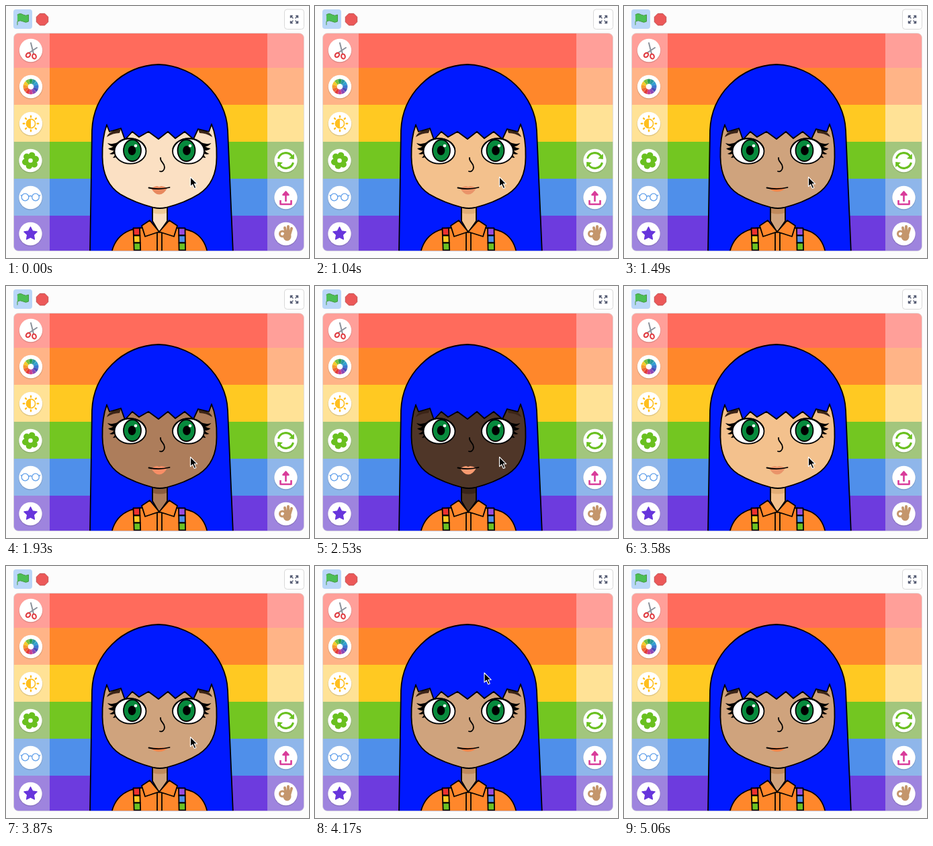
An HTML page for the animation above (5.51 s loop, 451 px wide and 375 px high).

```html
<!DOCTYPE html>
<html lang="en">
<head>
<meta charset="utf-8">
<title>Avatar maker</title>
<style>
html, body { margin: 0; width: 100%; height: 100%; overflow: hidden; background: #fcfcfc; }
svg { display: block; width: 451px; height: 375px; }
.ink { stroke: #000; stroke-width: 1.8; stroke-linejoin: round; stroke-linecap: round; }
.line { fill: none; }
</style>
</head>
<body>
<svg viewBox="0 0 451 375">
  <defs>
    <clipPath id="stageClip"><rect x="11.5" y="40.5" width="432" height="324" rx="7"/></clipPath>
    <g id="eye">
      <path d="M168 202Q159 207 151 204Q155 209 160 209Q156 212 152 212Q156 216 161 215Q158 219 154 220Q159 222 163 219Q162 223 159 226Q164 226 167 223Z"/>
      <ellipse class="ink" cx="185" cy="216" rx="23.5" ry="18.7" fill="#fff"/>
      <ellipse class="ink" cx="188" cy="215" rx="13" ry="16" fill="#078a3d"/>
      <ellipse cx="187.5" cy="215" rx="5.8" ry="7"/>
      <path class="ink line" d="M161 212Q167 197 185 197Q202 198 208 212"/>
    </g>
    <path id="brow" d="M150 195Q152 188 164 184L171 183L169 189Q159 189 150 195Z" fill="#3b2417"/>
  </defs>

  <rect x="11" y="5" width="28" height="29" rx="4" fill="#b9d6f8"/>
  <path d="M17 13Q21 10 25.5 13Q29.5 15.5 33.5 13V23Q29.5 25.5 25.5 23Q21 20.5 17 23V28" fill="#4cbf56" stroke="#45993d" stroke-linecap="round"/>
  <path d="M50.3 11.3H57.7L62.7 16.3V23.7L57.7 28.7H50.3L45.3 23.7V16.3Z" fill="#ec5959" stroke="#c24c4c" stroke-linejoin="round"/>
  <rect x="414.5" y="5" width="29" height="29.500" rx="4" fill="#fff" stroke="#d9d9d9"/>
  <g id="expand" fill="#575e75" stroke="#575e75" stroke-width="1.5" stroke-linecap="round" stroke-linejoin="round"></g>

  <g clip-path="url(#stageClip)">
    <g id="stripes"></g>
    <path class="ink" d="M125 368L128 185C130 132 172 89 227 87C283 89 328 134 330 185L338 368Z" fill="#0019ff"/>
    <path class="ink" id="neck" d="M218 296V320L228 337L240 320V296Z"/>
    <path id="neckShade" d="M219 298H239V308Q229 311 219 308Z"/>
    <path class="ink" d="M157 368Q162 343 184 334Q194 330 206 330L228 337L251 330Q267 331 278 336Q296 345 300 368Z" fill="#ff872b"/>
    <g id="straps"></g>
    <path class="ink" d="M214 319L202 327L207 343L228 336ZM243 319L255 327L250 343L228 336Z" fill="#ff872b"/>
    <path class="ink line" d="M225 338V364M232 338V364"/>
    <path class="ink" id="face" d="M150 177C145 190 143 205 143.500 225C144 252 153 269 170 280C187 290 208 297 220 300Q229 302 238 300C250 297 271 290 287 280C304 269 313.500 252 313.500 225C314 205 312 190 306 176L298 170H158Z"/>
    <use href="#brow"/>
    <use href="#brow" transform="matrix(-1 0 0 1 457 0)"/>
    <path d="M150 177L154 187L171 182L177 199L188 187L198 195L212 187L227 198L241 187L252 197L266 187L279 198L286 183L302 187L306 176L300 150H158Z" fill="#0019ff"/>
    <path class="ink line" d="M150 177L154 187L171 182L177 199L188 187L198 195L212 187L227 198L241 187L252 197L266 187L279 198L286 183L302 187L306 176"/>
    <use href="#eye"/>
    <use href="#eye" transform="matrix(-1 0 0 1 456.5 0)"/>
    <circle cx="193" cy="208" r="2.300" fill="#fff"/>
    <circle cx="274" cy="208" r="2.300" fill="#fff"/>
    <path class="ink line" d="M230 226C229 232 236 233 236 240C236 245 232 247 229 246"/>
    <path id="lips" d="M216 -1Q222 -4 225 -4L228 -3L231 -4Q235 -4 240 -1Q235 8.500 228 8.500Q221 8.500 216 -1Z"/>
    <path class="ink line" d="M212.500 270.500Q228 274 243.500 270" stroke-width="1.600"/>
    <g id="buttons"></g>

    <g fill="none" stroke-linecap="round">
      <path d="M37 55L41 71M46 62L34 70" stroke="#8b929b" stroke-width="2"/>
      <ellipse cx="33" cy="73" rx="2.800" ry="3.600" transform="rotate(45 33 73)" stroke="#e0393e" stroke-width="2"/>
      <ellipse cx="42" cy="75" rx="2.800" ry="3.600" transform="rotate(-15 42 75)" stroke="#e0393e" stroke-width="2"/>
    </g>
    <g id="wheel"></g>
    <g id="sun" stroke="#ffbf1f" stroke-width="2.400" stroke-linecap="round"></g>
    <circle cx="37" cy="175" r="6.600" fill="#fff" stroke="#ffbf1f" stroke-width="1.600"/>
    <path d="M37 168.400a6.600 6.600 0 0 0 0 13.200z" fill="#ffbf1f"/>
    <g id="flower" fill="#69c01f"></g>
    <circle cx="36.500" cy="230" r="3.300" fill="#fff"/>
    <g fill="none" stroke="#62a0ea" stroke-width="1.300">
      <circle cx="28.500" cy="284.500" r="5.300"/><circle cx="44" cy="284.500" r="5.300"/>
      <path d="M33.800 283.500Q36.300 281.500 38.700 283.500M23.200 283L22 281M49.300 283L51 281"/>
    </g>
    <path id="star" fill="#6735dc" stroke="#6735dc" stroke-width="1.500" stroke-linejoin="round"/>
    <g id="refresh" fill="#69c01f"></g>
    <path d="M408.500 289V295H424.500V289M416.500 291V279M412.500 281L416.500 276.500L420.500 281Z" fill="none" stroke="#d93c9a" stroke-width="2.600" stroke-linejoin="round"/>
    <g fill="none" stroke="#c4966c" stroke-linecap="round" stroke-width="4">
      <path d="M417 339L415 330M420 338L420 328M422 341L425 331"/>
      <circle cx="411.500" cy="339" r="4" stroke-width="3"/>
      <ellipse cx="418.500" cy="343" rx="4" ry="4.500" fill="#c4966c"/>
    </g>
  </g>
  <rect x="11.500" y="40.500" width="432" height="324" rx="7" fill="none" stroke="#d9d9d9" stroke-opacity=".7"/>
  <path id="cursor" d="M0 0V14.200L3.300 11.200L5.800 17L8.300 15.900L5.800 10.300H10.300Z" stroke="#fff" stroke-width="1.100" stroke-linejoin="round"/>
</svg>
<script>
const LOOP = 5510;
const byId = id => document.getElementById(id);
const fill = (id, markup) => { byId(id).innerHTML = markup; };
const ring = (n, draw) => Array.from({ length: n }, (_, i) => draw(i * 360 / n, i)).join('');

const stripes = [
  [40, '#ff6b5c', '#ff9f99'], [92, '#ff872b', '#ffb487'], [147, '#ffc922', '#ffe296'],
  [202, '#73c621', '#a2c67d'], [257, '#4f8fea', '#8fb6ea'], [312, '#6d3bde', '#9e84de']
];
fill('stripes', stripes.map(([y, main, pale], i) => {
  const height = (stripes[i + 1] || [365])[0] - y;
  const bar = (x, width, color) => `<rect x="${x}" y="${y}" width="${width}" height="${height}" fill="${color}"/>`;
  return bar(11, 54, pale) + bar(65, 324, main) + bar(389, 55, pale);
}).join(''));

const disc = (x, y) =>
  `<circle cx="${x}" cy="${y + 1}" r="17.8" fill="#000" opacity=".12"/><circle cx="${x}" cy="${y}" r="17.2" fill="#fff"/>`;
fill('buttons', [66, 120, 175, 230, 285, 339].map((y, i) =>
  disc(i < 3 ? 37 : 36.5, y) + (i > 2 ? disc(416.5, y) : '')).join(''));

const strap = (x, lean, colors) => colors.map((color, i) =>
  `<path class="ink" d="M${x + lean * i} ${330.5 + i * 11}h9.500l${lean} 11h-9.500z" fill="${color}"/>`).join('');
fill('straps', strap(189.5, .4, ['#ee3030', '#ffc922', '#6cc222']) + strap(257, .2, ['#9a4be0', '#4f8fea', '#6cc222']));

fill('expand', ring(4, angle =>
  `<path transform="rotate(${angle} 429 20)" d="M431 18L434 15M431.800 14.500H434.500V17.200Z"/>`));
const wheelColors = ['#2f9e54', '#2a9aa0', '#32a0d0', '#3a78d0', '#4b50b8', '#8e48b5', '#c93f8d', '#e23b3b', '#ef6a35', '#f59a2c', '#f6c92c', '#7cc03a'];
fill('wheel', ring(12, (angle, i) =>
  `<path transform="rotate(${angle} 37 120)" d="M35.800 115.700L34.100 108.900A11.500 11.500 0 0 1 39.900 108.900L38.200 115.700Z" fill="${wheelColors[i]}"/>`));
fill('sun', ring(8, angle => `<path transform="rotate(${angle} 37 175)" d="M37 165.300V163.800"/>`));
fill('flower', ring(6, angle => `<circle transform="rotate(${angle + 15} 36.500 230)" cx="36.500" cy="222" r="4.800"/>`)
  + '<circle cx="36.500" cy="230" r="6.500"/>');
fill('refresh', ring(2, angle => `<g transform="rotate(${angle} 416.500 230)">
  <path d="M405.500 227A11.300 11.300 0 0 1 426 224" fill="none" stroke="#69c01f" stroke-width="3"/>
  <path d="M428.800 220V228L421 227Z"/></g>`));
byId('star').setAttribute('d', 'M' + ring(10, (angle, i) => {
  const a = (angle - 90) * Math.PI / 180, r = i % 2 ? 5 : 10;
  return `${36.5 + r * Math.cos(a)} ${339 + r * Math.sin(a)} `;
}) + 'Z');

const tones = [
  { skin: '#fbe0c3', shade: '#efcb98', lips: '#e8895f', fullness: 1 },
  { skin: '#f3c18d', shade: '#e3ae76', lips: '#ea946a', fullness: 1 },
  { skin: '#cfa37d', shade: '#c08a5c', lips: '#f78449', fullness: .5 },
  { skin: '#ad7d5b', shade: '#8a5c3e', lips: '#fa8e66', fullness: 1 },
  { skin: '#4f3628', shade: '#3a251a', lips: '#f99a70', fullness: 1 }
];
const toneTimes = [0, 1040, 1490, 1930, 2530, 3130, 3580, 3870];
const cursorStops = [
  [0, 274.5, 254.5], [4020, 260, 183], [4170, 252, 159], [4770, 251, 159], [4920, 185, 140], [5060, -40, -40]
];

function render(ms) {
  const t = ms % LOOP;
  const step = toneTimes.filter(start => start <= t).length - 1;
  const { skin, shade, lips, fullness } = tones[step % tones.length];
  byId('face').setAttribute('fill', skin);
  byId('neck').setAttribute('fill', skin);
  byId('neckShade').setAttribute('fill', shade);
  byId('lips').setAttribute('fill', lips);
  byId('lips').setAttribute('transform', `translate(0 272) scale(1 ${fullness})`);
  const [, x, y] = cursorStops.filter(([start]) => start <= t).pop();
  byId('cursor').setAttribute('transform', `translate(${x} ${y})`);
}

const began = performance.now();
function tick() {
  render(performance.now() - began);
  requestAnimationFrame(tick);
}
render(0);
requestAnimationFrame(tick);
</script>
</body>
</html>
```
